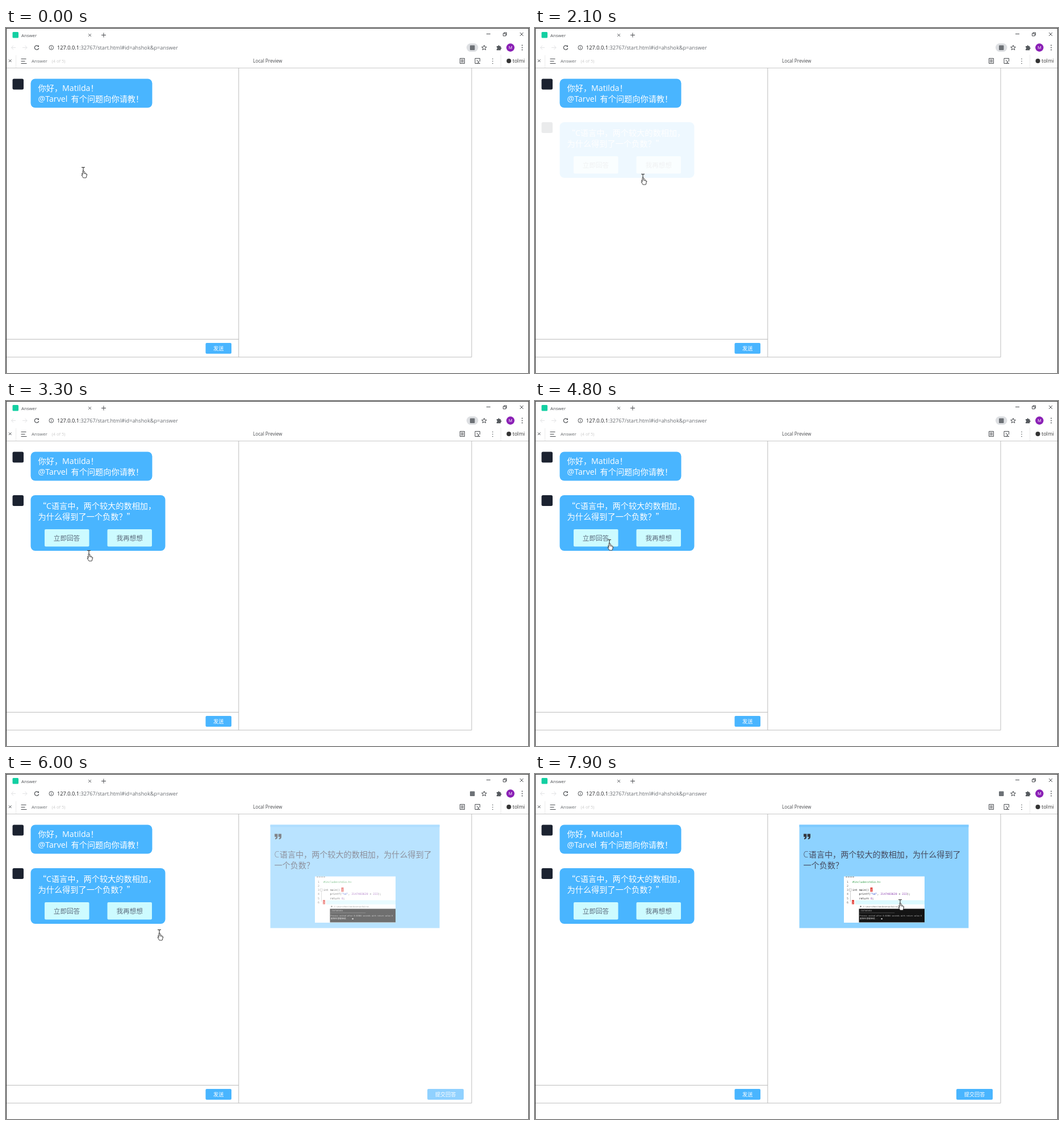
An HTML page that plays this animation: 921 by 608 pixels, repeating every 8 s.

```html
<!DOCTYPE html>
<html>
<head>
<meta charset="utf-8">
<title>Answer</title>
<style>
html, body { margin: 0; width: 100%; height: 100%; overflow: hidden; background: #fff; }
svg { display: block; width: 921px; height: 608px; }
text { font-family: "Open Sans", "Noto Sans", sans-serif; white-space: pre; }
.zh { font-family: "Noto Sans CJK SC", "Noto Sans CJK", sans-serif; }
.en { font-family: "Open Sans", "Noto Sans", sans-serif; }
.mono { font-family: "DejaVu Sans Mono", monospace; font-size: 4.85px; }
.tiny { font-size: 3.25px; }
.chat { font-size: 14.2px; fill: #fff; font-weight: 500; }
.blue { fill: #49b5ff; }
.act { font-size: 11.6px; fill: #5b6b7c; text-anchor: middle; }
.send { font-size: 9.2px; fill: #fff; text-anchor: middle; font-weight: 500; }
.ico { fill: none; stroke: #4a4d51; stroke-width: 1; }
.rule { fill: none; stroke: #bdbdbd; }

.bubble, .card, .pill, .cur, .cur g { animation: 8s step-end infinite; }
.bubble { animation-name: bubble; }
.card { animation-name: card; }
.pill { animation-name: pill; }
.cur { animation-name: move; }
.arrow { animation-name: arrow; }
.beam { animation-name: beam; }
.hand { animation-name: hand; }

@keyframes bubble {
  0% { opacity: 0 } 25% { opacity: .022 } 26.25% { opacity: .087 } 27.5% { opacity: .19 }
  28.75% { opacity: .32 } 30% { opacity: .46 } 31.25% { opacity: .61 } 32.5% { opacity: .75 }
  33.75% { opacity: .87 } 35% { opacity: .95 } 36.25%, 100% { opacity: 1 }
}
@keyframes card {
  0% { opacity: 0 } 68.75% { opacity: .022 } 70% { opacity: .087 } 71.25% { opacity: .19 }
  72.5% { opacity: .32 } 73.75% { opacity: .46 } 75% { opacity: .61 } 76.25% { opacity: .75 }
  77.5% { opacity: .87 } 78.75% { opacity: .95 } 80%, 100% { opacity: 1 }
}
@keyframes pill { 0% { opacity: 1 } 65%, 100% { opacity: 0 } }
@keyframes arrow {
  0% { opacity: 1 } 30% { opacity: 0 } 33.75% { opacity: 1 } 50% { opacity: 0 }
  72.5% { opacity: 1 } 81.25%, 100% { opacity: 0 }
}
@keyframes beam {
  0% { opacity: 0 } 30% { opacity: 1 } 33.75% { opacity: 0 }
  81.25% { opacity: 1 } 96.25%, 100% { opacity: 0 }
}
@keyframes hand {
  0% { opacity: 0 } 50% { opacity: 1 } 72.5% { opacity: 0 } 96.25%, 100% { opacity: 1 }
}
/* one step per 100 ms */
@keyframes move {
  0% { transform: translate(136px, 251px) }
  4.75% { transform: translate(137px, 249px) }
  6.25% { transform: translate(138px, 251px); animation-timing-function: steps(3) }
  10% { transform: translate(144px, 264px); animation-timing-function: steps(3) }
  13.75% { transform: translate(153px, 278px); animation-timing-function: steps(2) }
  16.25% { transform: translate(157px, 279px); animation-timing-function: steps(4) }
  21.25%, 25% { transform: translate(190px, 263px) }
  26.25% { transform: translate(190px, 263px); animation-timing-function: steps(4) }
  31.25% { transform: translate(227px, 240px); animation-timing-function: steps(3) }
  35% { transform: translate(205px, 254px); animation-timing-function: steps(5) }
  41.25% { transform: translate(146px, 269px); animation-timing-function: steps(4) }
  46.25% { transform: translate(130px, 261px); animation-timing-function: steps(5) }
  52.5% { transform: translate(131px, 250px) }
  63.75% { transform: translate(133px, 250px); animation-timing-function: steps(2) }
  66.25% { transform: translate(139px, 250px) }
  71.25% { transform: translate(139px, 250.5px); animation-timing-function: steps(3) }
  75% { transform: translate(270px, 280px); animation-timing-function: steps(2) }
  77.5% { transform: translate(380px, 320px); animation-timing-function: steps(2) }
  80% { transform: translate(502px, 348px) }
  81.25% { transform: translate(572px, 370px) }
  82.5% { transform: translate(612px, 385px); animation-timing-function: steps(2) }
  85% { transform: translate(638px, 394px) }
  87.5% { transform: translate(638px, 394px); animation-timing-function: steps(2) }
  90% { transform: translate(644px, 360px); animation-timing-function: steps(2) }
  92.5% { transform: translate(657px, 322px); animation-timing-function: steps(2) }
  95% { transform: translate(660px, 291px); animation-timing-function: steps(2) }
  97.5% { transform: translate(648px, 236px) }
  98.75%, 100% { transform: translate(643px, 227px) }
}
</style>
</head>
<body>
<svg viewBox="0 0 921 608">
  <rect width="921" height="608" fill="#fff"/>

  <!-- tab bar -->
  <rect x="11.5" y="7" width="10.5" height="10.5" rx="1.5" fill="#12cfa2"/>
  <text x="27" y="15.5" font-size="7.8" fill="#4a4d51">Answer</text>
  <path class="ico" d="M145.3 10.3l4.6 4.6M149.9 10.3l-4.6 4.6M168 12.5h8M172 8.5v8" stroke-width="1.2"/>
  <path class="ico" d="M846 10.5h7M875.5 9.5h4.500v4.500h-4.500zM877 9.500v-1.500h4.500v4.500h-1.500M905 8l6 6M911 8l-6 6" stroke-width=".9"/>

  <!-- address bar -->
  <g class="ico">
    <path d="M17 34.500h-7M13 31l-3.500 3.500 3.500 3.500M29 34.500h8M33.500 31l3.500 3.500-3.500 3.500" stroke="#e2e3e5"/>
    <path d="M57 32.200a3.700 3.700 0 1 0 .7 3.300" stroke-width="1.2"/>
    <path d="M58 30.200v3h-3z" fill="#4a4d51" stroke="none"/>
    <circle cx="79.800" cy="34.500" r="3.800"/>
    <path d="M79.800 34v2.600M79.800 32.200v1"/>
    <path d="M842 30.300l1.200 3 3.200.2-2.500 2 .9 3.200-2.800-1.800-2.800 1.800.9-3.200-2.500-2 3.200-.2z"/>
  </g>
  <text x="90" y="37.800" font-size="9.23" fill="#202124">127.0.0.1<tspan fill="#686c71">:32767/start.html#id=ahshok&amp;p=answer</tspan></text>
  <rect class="pill" x="811" y="27" width="20.500" height="15" rx="7.500" fill="#dddfe2"/>
  <rect x="817" y="30.500" width="8.500" height="8.500" rx="1" fill="#6d7176"/>
  <path d="M864 32h2.300a1.400 1.400 0 0 1 2.800 0h2.100v2.300a1.400 1.400 0 0 1 0 2.800v2.200h-7.200v-2.400a1.300 1.300 0 0 0 0-2.600z" fill="#55595e"/>
  <circle cx="888.300" cy="34.500" r="7.200" fill="#8a1fb5"/>
  <text x="888.300" y="37.300" font-size="7.500" fill="#fff" text-anchor="middle">M</text>
  <path d="M909 30.500v.01M909 34.500v.01M909 38.500v.01" stroke="#4a4d51" stroke-width="1.800" stroke-linecap="round"/>

  <!-- preview toolbar -->
  <path class="ico" d="M5 55.500l4.500 4.500M9.500 55.500l-4.500 4.500"/>
  <path d="M17.500 48v22M871.500 47v23" stroke="#ececec"/>
  <path class="ico" d="M26.500 54.500h9M26.500 58.500h7M26.500 62.500h10"/>
  <text x="45" y="61" font-size="8" fill="#66696d">Answer</text>
  <text x="80.500" y="61" font-size="7.500" fill="#cbcbcb">(4 of 5)</text>
  <text x="435" y="61" font-size="8.200" fill="#47494c">Local Preview</text>
  <path class="ico" d="M799.500 53.500h8v9h-8zM801 56h5M801 58h5M801 60h5"/>
  <path class="ico" d="M834.500 59v-5.500h-8.500v9h4M829 56l4 5.500M833 59l-3 3.500h5"/>
  <path d="M857 54.500v.01M857 58.500v.01M857 62.500v.01" stroke="#4a4d51" stroke-width="1.600" stroke-linecap="round"/>
  <circle cx="885.500" cy="58" r="4" fill="#333"/>
  <text x="892" y="61.300" font-size="9" fill="#333">tolmi</text>

  <!-- panels -->
  <path class="rule" d="M0 70.500h921" stroke-opacity=".8"/>
  <path class="rule" d="M1 548.500h409M1 580h819M409.800 70v510M820 70v510"/>
  <rect class="blue" x="351.500" y="555" width="45.500" height="19" rx="2"/>
  <text class="zh send" x="374.200" y="568.200">发送</text>

  <!-- greeting -->
  <rect x="11.500" y="89.500" width="19.500" height="19" rx="2.500" fill="#1b2230"/>
  <rect class="blue" x="43.500" y="89.500" width="214" height="51" rx="8"/>
  <text class="zh chat" x="56.500" y="111">你好，<tspan class="en" x="99">Matilda</tspan><tspan x="148.500">！</tspan></text>
  <text class="zh chat" x="56.500" y="130"><tspan class="en">@Tarvel</tspan><tspan x="114.500">有个问题向你请教！</tspan></text>

  <!-- question -->
  <g class="bubble">
    <rect x="11.500" y="166" width="19.500" height="19" rx="2.500" fill="#1b2230"/>
    <rect class="blue" x="43.500" y="166" width="237" height="98" rx="8"/>
    <text class="zh chat" x="57" y="190">“<tspan class="en" x="71">C</tspan><tspan x="79.800">语言中，两个较大的数相加，</tspan></text>
    <text class="zh chat" x="56.500" y="209">为什么得到了一个负数？”</text>
    <g fill="#cdfbff">
      <rect x="68" y="226" width="78.500" height="30.500" rx="2"/>
      <rect x="178.500" y="226" width="78.500" height="30.500" rx="2"/>
    </g>
    <text class="zh act" x="107" y="246">立即回答</text>
    <text class="zh act" x="217.600" y="246">我再想想</text>
  </g>

  <!-- answer card -->
  <g class="card">
    <rect x="465.500" y="89.500" width="298" height="182" fill="#8dd2ff"/>
    <path d="M465.500 91.500h298" stroke="#7dcaff" stroke-width="4"/>
    <path id="q" d="M473 105.500h5.300v5.200q0 4-4.300 4.600v-1.900q1.800-.5 1.800-2.700h-2.800z" fill="#33383f"/>
    <use href="#q" x="6.700"/>
    <g class="zh" font-size="14.100" font-weight="300" fill="#454a5e">
      <text x="472.500" y="147"><tspan class="en">C</tspan><tspan class="zh" x="481.800">语言中，两个较大的数相加，为什么得到了</tspan></text>
      <text class="zh" x="472.500" y="166">一个负数？</text>
    </g>

    <rect x="544" y="180.500" width="142" height="81.500" fill="#fff"/>
    <rect x="564" y="222.500" width="122" height="7.500" fill="#dcfaff"/>
    <path d="M547 181.500h16" stroke="#777" stroke-dasharray="3 1"/>
    <path d="M555.500 205v20" stroke="#aaa" stroke-width=".6"/>
    <rect x="553.700" y="202.700" width="3.400" height="3.400" fill="#fff" stroke="#999" stroke-width=".5"/>
    <rect x="590.500" y="200" width="4" height="7.500" fill="#e2453f"/>
    <rect x="558" y="222" width="4" height="7.500" fill="#e2453f"/>
    <g class="mono" fill="#666">
      <text class="mono" x="549" y="191.500">1</text><text class="mono" x="549" y="198.700">2</text>
      <text class="mono" x="549" y="206">3</text><text class="mono" x="549" y="213.200">4</text>
      <text class="mono" x="549" y="220.500">5</text><text class="mono" x="549" y="227.700">6</text>
    </g>
    <g fill="#222">
      <text class="mono" x="559" y="191.500" fill="#2e9b45">#include&lt;stdio.h&gt;</text>
      <text class="mono" x="559" y="206">int main() <tspan fill="#fff">{</tspan></text>
      <text class="mono" x="570.500" y="213.200">printf(<tspan fill="#2e4bd0">"%d"</tspan>, <tspan fill="#8a3cae">2147483620</tspan> + <tspan fill="#8a3cae">222</tspan>);</text>
      <text class="mono" x="570.500" y="220.500">return <tspan fill="#8a3cae">0</tspan>;</text>
      <text class="mono" x="558.600" y="227.700" fill="#fff">}</text>
    </g>
    <rect x="570.500" y="229.800" width="115.500" height="7.700" fill="#fff"/>
    <rect x="572.500" y="232.500" width="2" height="2" fill="#555"/>
    <text class="mono tiny" x="578" y="234.700" fill="#555">C:\Users\Matilda\Desktop\Eqline</text>
    <rect x="570.500" y="237.500" width="115.500" height="24" fill="#141414"/>
    <g fill="#d5d5d5">
      <text class="mono tiny" x="571.500" y="241.700">-2147483454</text>
      <path d="M571.500 244.700h62" stroke="#999" stroke-width=".5" stroke-dasharray="1.500 .5"/>
      <text class="mono tiny" x="571.500" y="250.700">Process exited after 0.02904 seconds with return value 0</text>
      <text class="zh" x="571.500" y="255.700" font-size="3.900">请按任意键继续. . .</text>
      <rect x="609.500" y="254.500" width="2.200" height="1.600" fill="#fff"/>
    </g>

    <rect class="blue" x="742" y="555" width="64" height="19" rx="2"/>
    <text class="zh send" x="774" y="568.200">提交回答</text>
  </g>

  <path d="M.5 608V.5h920V608" fill="none" stroke="#2a2a2a"/>

  <!-- pointer -->
  <g class="cur" stroke-linejoin="round">
    <g class="arrow"><path d="M.5.500v10l2.300-2 1.600 3.400 1.500-.7-1.500-3.300h2.800z" fill="#fff" stroke="#555" stroke-width=".9"/></g>
    <g class="beam"><path d="M-3-5.500h2.300l.7.700.7-.7H3M0-5V5M-3 5.500h2.300L0 5l.7.500H3" fill="none" stroke="#333" stroke-width="1.100"/></g>
    <g class="hand"><path d="M-1 1q1-1.500 2 0v4l4 1q1 .3 1 1.500v2.300l-1 3.200h-5l-3-5q-.3-1.400 2 .3z" fill="#fff" stroke="#333" stroke-width=".9"/></g>
  </g>
</svg>
</body>
</html>
```
